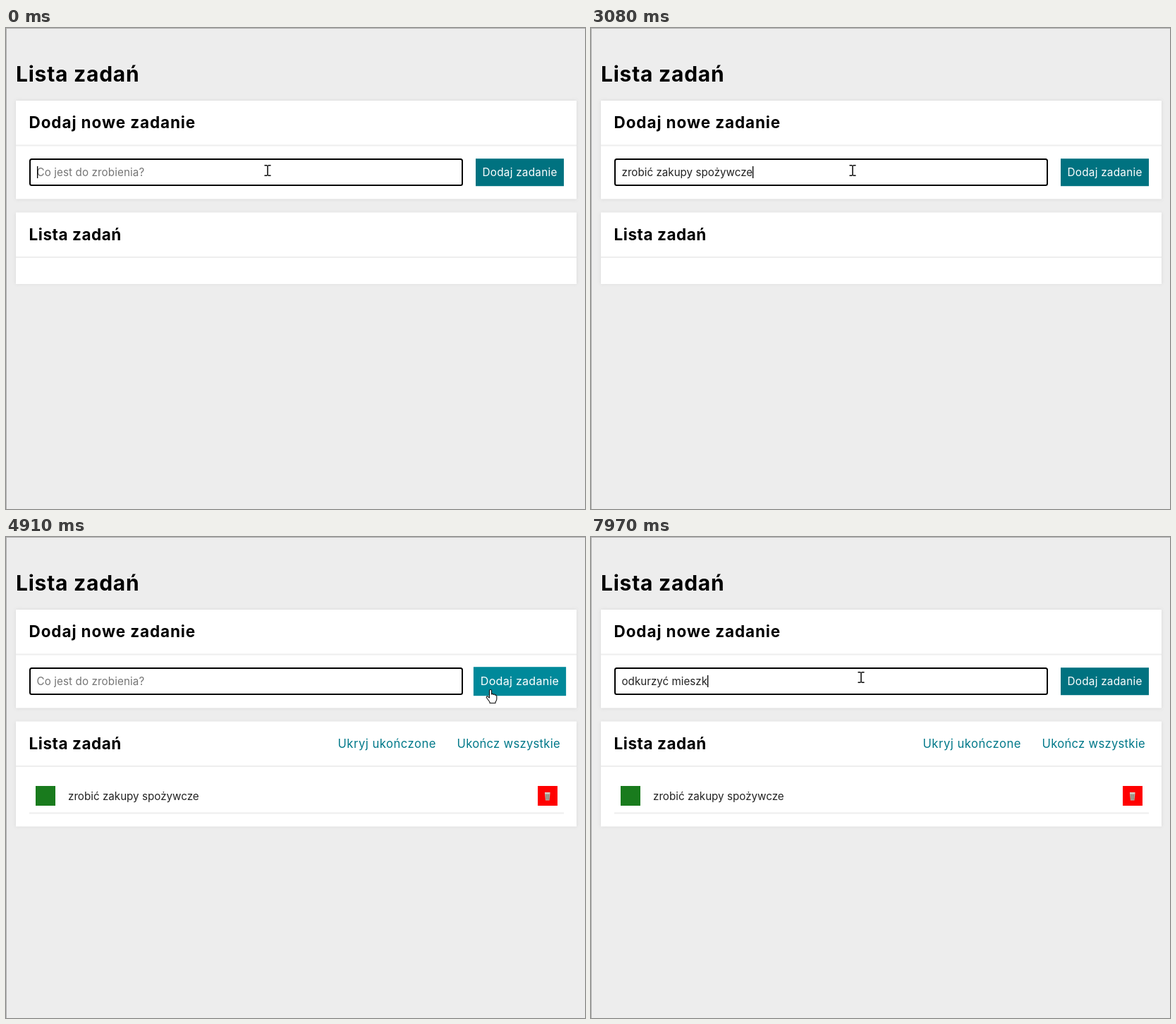
These frames come from a looping animation (821 by 682 pixels, 8000 ms). An HTML page with a canvas:

```html
<!DOCTYPE html>
<html lang="pl">
<head>
<meta charset="utf-8">
<title>Lista zadań</title>
<style>
  html, body { margin: 0; width: 100%; height: 100%; overflow: hidden; background: #ededed; }
  canvas { display: block; }
</style>
</head>
<body>
<canvas id="stage" width="821" height="682"></canvas>
<script>
const ctx = document.getElementById('stage').getContext('2d');
const LOOP = 8000, BLINK = 530;
const CLICK = 4530, ADDED = 4720;
const HOVER_IN = 4200, HOVER_OUT = 5060, FADE = 500;
const TASK = 'zrobić zakupy spożywcze';

// Bursts of typing: first key, last key, letters (one array item per key press)
const bursts = [
  [100, 100, 'z'], [300, 560, 'robi'], [820, 820, 'ć'], [970, 1060, ' z'],
  [1220, 1420, 'aku'], [1600, 1840, 'py '], [2000, 2120, 'spo'], [2390, 2390, 'ż'],
  [2580, 2680, 'yw'], [2870, 2920, 'cz'], [3080, 3080, 'e'],
  [6150, 6150, 'o'], [6350, 6410, 'dk'], [6650, 6650, ['ur']], [6850, 6920, 'zy'],
  [7230, 7230, 'ć'], [7390, 7760, ' mies'], [7910, 7970, 'zk']
];
const keys = bursts.flatMap(([from, to, letters]) =>
  [...letters].map((text, i, all) => ({ text, at: from + (to - from) * i / Math.max(1, all.length - 1) })));

// Pointer path: time, x, y
const path = [
  [3600, 371, 202], [3750, 402, 204], [3950, 520, 212], [4130, 640, 219], [4250, 682, 221],
  [4340, 689, 219], [4450, 687, 216], [4920, 687, 216], [5070, 662, 211], [5140, 618, 205],
  [5240, 500, 197], [5350, 404, 191], [5500, 386, 190], [5750, 382, 195], [6020, 383, 199]
];

const clamp = v => Math.min(1, Math.max(0, v));
const ease = v => v * v * (3 - 2 * v);

function pointerAt(t) {
  const time = Math.floor((t - 3600) / 70) * 70 + 3600;
  const next = path.findIndex(p => p[0] > time);
  if (next === 0) return path[0].slice(1);
  if (next < 0) return path[path.length - 1].slice(1);
  const a = path[next - 1], b = path[next];
  const k = (time - a[0]) / (b[0] - a[0]);
  return [a[1] + (b[1] - a[1]) * k, a[2] + (b[2] - a[2]) * k];
}

function rect(x, y, w, h, color) {
  ctx.fillStyle = color;
  ctx.fillRect(x, y, w, h);
}

function setFont(size, weight = 400, spacing = 0) {
  ctx.font = `${weight} ${size}px Inter, "Open Sans", sans-serif`;
  ctx.letterSpacing = spacing + 'px';
}

function label(text, x, y, color) {
  ctx.fillStyle = color;
  ctx.fillText(text, x, y);
}

function panel(y, h) {
  ctx.save();
  ctx.shadowColor = '#d8d8d8';
  ctx.shadowBlur = 5;
  rect(14, y, 795, h, '#fff');
  ctx.restore();
  rect(14, y + 62.5, 795, 2, '#eee');
}

function drawInput(t) {
  ctx.strokeStyle = '#000';
  ctx.lineWidth = 2;
  ctx.beginPath();
  ctx.roundRect(34, 186, 613, 37, 2.5);
  ctx.stroke();

  const since = t < ADDED ? 0 : ADDED;
  const typed = keys.filter(k => k.at >= since && k.at <= t);
  const text = typed.map(k => k.text).join('');
  setFont(15.2);
  if (text) {
    label(text, 43.5, 210, '#222');
  } else {
    setFont(15.2, 400, 0.1);
    label('Co jest do zrobienia?', 43.5, 210, '#757575');
  }

  const lastKey = keys.filter(k => k.at <= t).pop();
  const idle = t - (lastKey ? lastKey.at : 0);
  if (Math.floor(idle / BLINK) % 2 === 0) {
    rect(Math.round(43.5 + ctx.measureText(text).width), 196, 1.3, 17, '#000');
  }
}

function drawButton(t) {
  const k = ease(clamp((t - HOVER_IN) / FADE)) - ease(clamp((t - HOVER_OUT) / FADE));
  const light = 1 + 0.2 * k;
  ctx.save();
  ctx.translate(728.5, 204.7);
  ctx.scale(1 + 0.05 * k, 1 + 0.05 * k);
  rect(-62.5, -19.5, 125, 39, `rgb(0, ${114 * light}, ${128 * light})`);
  setFont(15.3, 400, 0.25);
  label('Dodaj zadanie', -53, 5.3, '#fff');
  ctx.restore();
}

function drawTrash(x, y) {
  rect(x, y, 28, 28, '#f00');
  rect(x + 10, y + 9, 7.5, 2, '#d5cfc4');
  ctx.fillStyle = '#b9b3a6';
  ctx.beginPath();
  ctx.moveTo(x + 10, y + 11);
  ctx.lineTo(x + 17.5, y + 11);
  ctx.lineTo(x + 16.5, y + 20.5);
  ctx.lineTo(x + 11, y + 20.5);
  ctx.fill();
  for (const dx of [11.7, 13.5, 15.3]) rect(x + dx, y + 12, 0.7, 7.5, '#766f64');
}

function drawTask() {
  setFont(16.6, 400, 0.5);
  label('Ukryj ukończone', 470.5, 299, '#007889');
  setFont(16.6, 400, 0.3);
  label('Ukończ wszystkie', 639.5, 299, '#007889');
  rect(42, 353, 28, 28, '#197b1d');
  setFont(15.2);
  label(TASK, 88, 373, '#222');
  drawTrash(754, 353);
  rect(33, 390.5, 758, 2, '#eee');
}

function drawBeam(x, y) {
  rect(x - 0.75, y - 7, 1.5, 14, '#000');
  for (const dy of [-8, 6.5]) {
    rect(x - 4.5, y + dy, 4, 1.5, '#000');
    rect(x + 0.5, y + dy, 4, 1.5, '#000');
  }
}

function drawShape(x, y, d) {
  ctx.save();
  ctx.translate(x, y);
  const shape = new Path2D(d);
  ctx.fillStyle = '#fff';
  ctx.fill(shape);
  ctx.strokeStyle = '#111';
  ctx.lineWidth = 1.1;
  ctx.lineJoin = 'round';
  ctx.stroke(shape);
  ctx.restore();
}

const HAND = 'M-1.5 12V1.5Q0-1 1.5 1.5V7Q3 5.5 4.2 7.5Q5.8 6.3 6.7 8.3Q8.6 7.5 8.8 10V14Q8.5 16.5 7 18V19.5H-1V18L-5.5 12Q-6.5 9.5-4 10Z';
const ARROW = 'M0 0V16L3.7 12.5L6.2 18L8.5 17L6.1 11.6H11Z';

function drawPointer(t) {
  const [x, y] = pointerAt(t);
  if (x < 648) drawBeam(Math.round(x), Math.round(y));
  else drawShape(x, y, x < 665 ? ARROW : HAND);
  if (t >= CLICK && t < ADDED) {
    ctx.fillStyle = 'rgba(160, 200, 50, 0.8)';
    ctx.beginPath();
    ctx.arc(x, y, 11, 0, Math.PI * 2);
    ctx.fill();
  }
}

function draw(t) {
  const added = t >= ADDED;
  rect(0, 0, 821, 682, '#ededed');
  rect(0, 0, 821, 1, '#b0b0b0');
  rect(0, 0, 1, 682, '#b0b0b0');
  panel(103, 139.5);
  panel(261.5, added ? 149 : 101.5);

  setFont(30, 700, 0.75);
  label('Lista zadań', 14, 76, '#000');
  setFont(22.5, 700, 0.9);
  label('Dodaj nowe zadanie', 32.5, 142, '#000');
  setFont(22.5, 700, 0.55);
  label('Lista zadań', 32.5, 300.5, '#000');

  drawInput(t);
  drawButton(t);
  if (added) drawTask();
  drawPointer(t);
}

const start = performance.now();
function tick() {
  draw((performance.now() - start) % LOOP);
  requestAnimationFrame(tick);
}
tick();
</script>
</body>
</html>
```
